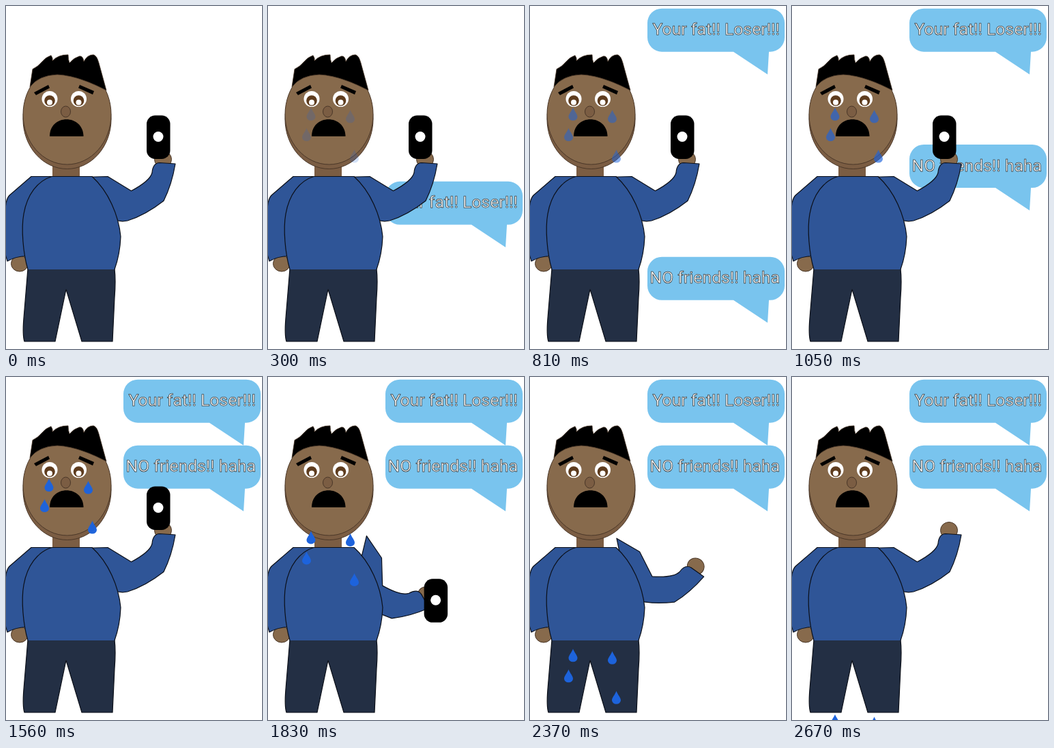
An HTML page that plays this animation: 375x500 px, repeating every 2700 ms.

```html
<!DOCTYPE html>
<html lang="en">
<head>
<meta charset="utf-8">
<title>Hurtful messages</title>
<style>
  html, body { margin: 0; width: 100%; height: 100%; overflow: hidden; background: #fff; }
  svg { display: block; width: 100%; height: 100%; }
  .bubble use { fill: #79c4ee; }
  .bubble text { font: 24.75px Roboto, sans-serif; fill: #fff; stroke: #333; stroke-width: .75; }
  .shirt { fill: #2f5597; stroke: #0b0f18; stroke-width: 1.2; stroke-linejoin: round; }
  .skin { fill: #876a4c; stroke: #4a3728; stroke-width: 1; }
  .shade { fill: #7b5d43; stroke: #4a3728; stroke-width: 1; }
  .iris { fill: #5e3c1e; }
  .tears { fill: #1d63dc; }
</style>
</head>
<body>
<svg viewBox="0 0 375 500">
  <defs>
    <path id="balloon" d="M193 0H352A21 21 0 0 1 373 21V42A21 21 0 0 1 352 63H350L348 96L298 63H193A21 21 0 0 1 172 42V21A21 21 0 0 1 193 0Z"/>
    <path id="drop" d="M0 -9.5C2 -4 6.5 0 6.5 4A6.5 5.5 0 0 1 -6.5 4C-6.5 0 -2 -4 0 -9.5Z"/>
  </defs>

  <g class="bubble" id="first">
    <use href="#balloon"/>
    <text x="179.5" y="38.5">Your fat!! Loser!!!</text>
  </g>
  <g class="bubble" id="second">
    <use href="#balloon"/>
    <text x="175.5" y="38.5">NO friends!! haha</text>
  </g>

  <!-- neck and resting arm -->
  <rect x="68" y="228" width="40" height="22" fill="#7b5d43"/>
  <ellipse class="skin" cx="20" cy="375.500" rx="12.5" ry="11.500"/>
  <path class="shirt" d="M70 248.500H37L5 276Q0 281 -1 296L-6 345L2 372Q14 365 29 364.500L60 300Z"/>

  <!-- raised arm -->
  <g id="arm">
    <ellipse class="skin" cx="230" cy="223.500" rx="12.500" ry="12"/>
    <path class="shirt" d="M110 249.500L149 248.500L183.500 269.500Q211 255 214 243Q215 229 225 228.500L248 230Q243 260 231 284Q204 305 178 313Q169 315 160 312L136 277Z"/>
  </g>

  <!-- trousers and torso -->
  <path d="M32 383H159Q161 400 159 425L156 489H111L88 413L72 489H27Q24 480 26 455Z"
        fill="#232f44" stroke="#0b0f18" stroke-width="1.2"/>
  <path d="M32 384C25 360 22 325 26 303C31 275 46 255 67 248.500H126C150 270 165 305 168 336Q167 362 159 384"
        class="shirt"/>

  <!-- head -->
  <ellipse class="shade" cx="89.5" cy="165" rx="64.5" ry="72.5"/>
  <ellipse class="skin" cx="89.5" cy="158" rx="64.5" ry="73"/>
  <path d="M35 118L39 92Q47 88 52 82Q59 74 66 72Q69 76 68 80Q76 71 91 71Q91 78 93 83Q100 75 108 73Q113 73 114 81Q119 71 128 71Q133 72 136 83L147 123C128 113 100 101 75 100Q48 101 35 118Z"
        stroke="#4a3728" stroke-width=".8"/>
  <path d="M41 126L62 115L64 119.500L44 130ZM108 115L129 124L127 129L106 119.500Z"/>
  <g id="eyes"></g>
  <ellipse class="shade" cx="87.5" cy="154" rx="7" ry="8"/>
  <path d="M64 190C64 157 113 157 113.500 190Z"/>

  <g id="phone">
    <rect x="206" y="159.500" width="34.500" height="63.500" rx="12.500"/>
    <circle cx="223" cy="190.500" r="7.500" fill="#fff"/>
  </g>
  <g class="tears" id="tears"></g>
</svg>
<script>
  const $ = id => document.getElementById(id);
  const STEP = 30, COUNT = 90;
  const RELEASE = 53;

  $('eyes').innerHTML = [64, 106.5].map(x =>
    `<circle cx="${x}" cy="135.500" r="11.500" fill="#fff"/>
     <circle class="iris" cx="${x}" cy="138" r="7.800"/>
     <circle cx="${x}" cy="140.500" r="4" fill="#fff"/>`).join('');

  $('tears').innerHTML = [[63, 157.5], [120.5, 161], [56.5, 187.5], [126.5, 219]].map(([x, y]) =>
    `<use href="#drop" x="${x}" y="${y}"/>`).join('');

  const clamp = v => Math.max(0, Math.min(1, v));
  const part = (n, from, to) => clamp((n - from) / (to - from));
  const mix = (a, b, k) => a + (b - a) * k;
  const move = (id, x, y) => $(id).setAttribute('transform', `translate(${x} ${y})`);

  function draw(ms) {
    const n = Math.floor(ms / STEP) % COUNT;
    const fall = Math.max(0, n - RELEASE);

    move('first', 0, mix(508, 3.7, part(n, 0, 20)));
    move('second', 0, mix(509, 99.7, part(n, 20, 40)));

    move('tears', 0, fall * 9.55);
    $('tears').setAttribute('opacity', part(n, 0, RELEASE));

    move('phone', fall * 2.83, fall * 16.85);

    const swing = 57 * (part(n, RELEASE, 58) - part(n, 71, 89));
    $('arm').setAttribute('transform', `rotate(${swing} 143.700 272.200)`);
  }

  const start = performance.now();
  function tick() {
    draw(performance.now() - start);
    requestAnimationFrame(tick);
  }
  draw(0);
  tick();
</script>
</body>
</html>
```
